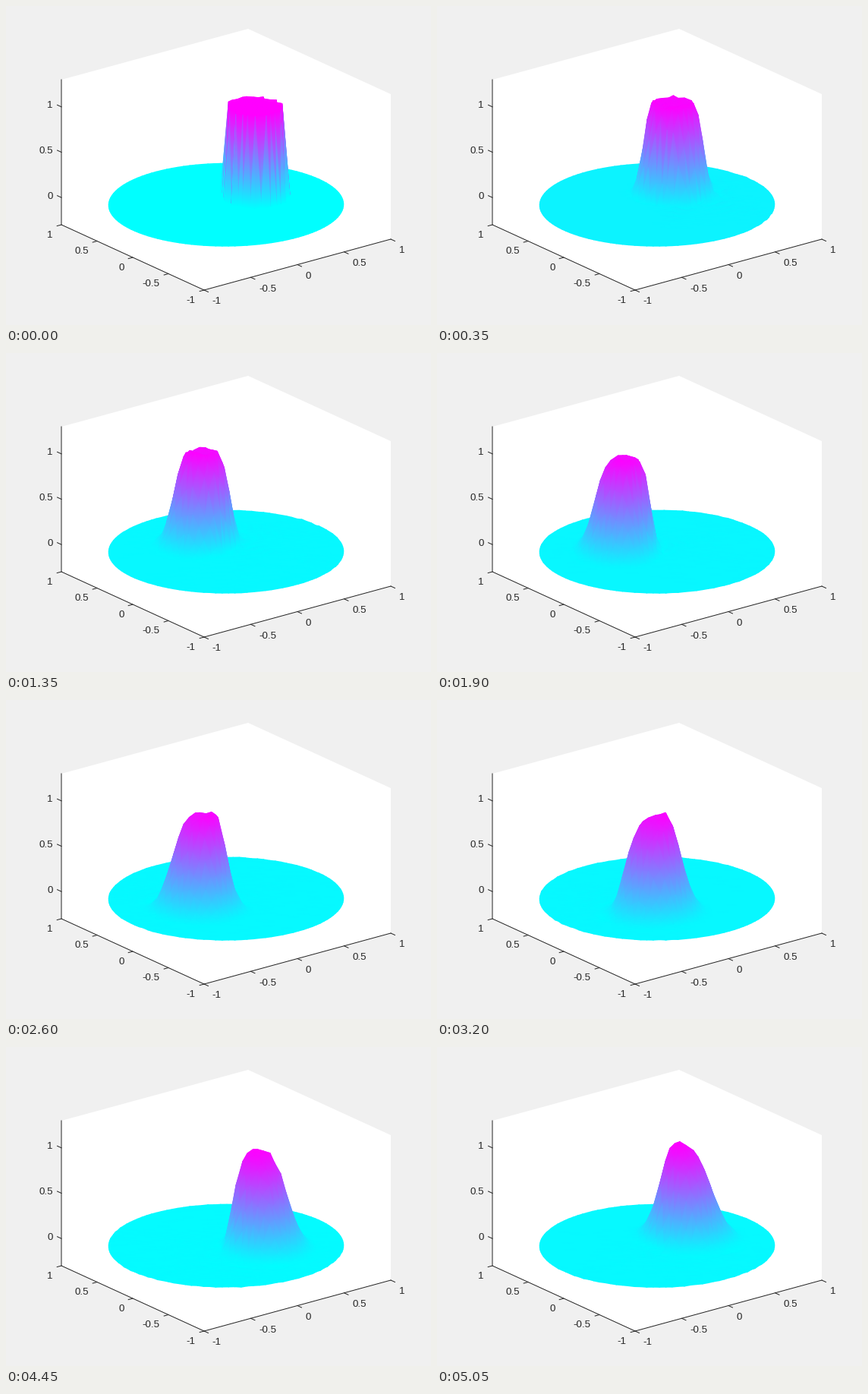
A matplotlib script for the animation above (5100 ms loop, 560 by 420 pixels).

```python
import matplotlib.pyplot as plt
import matplotlib.tri as mtri
import numpy as np
from matplotlib.animation import FuncAnimation

W, H, DPI = 560, 420, 100
FRAMES, INTERVAL = 102, 50
SIZE = 1 / 16                 # nominal mesh size
TURN = SIZE                   # radians per step, one cell at the rim
ZMIN, ZMAX, ZPX = -0.3, 1.3, 191 / 1.6
INK = "#262626"
PT = 72 / DPI                 # one pixel in points


def project(x, y, z):
    """Orthographic view of the box, in stage pixels."""
    px = 290 + 123 * x - 94 * y
    py = 297.5 - 33.5 * x - 43 * y - (z - ZMIN) * ZPX
    return px, py


def disk_mesh(h):
    rng = np.random.default_rng(4)
    n = int(1 / h) + 3
    col, row = np.meshgrid(np.arange(-n, n + 1), np.arange(-n, n + 1))
    x = h * (col + 0.5 * (row % 2)).ravel()
    y = h * np.sqrt(0.75) * row.ravel()
    x = x + rng.uniform(-0.2, 0.2, x.size) * h
    y = y + rng.uniform(-0.2, 0.2, y.size) * h
    inside = np.hypot(x, y) < 1 - 0.6 * h
    ring = np.linspace(0, 2 * np.pi, round(2 * np.pi / h), endpoint=False)
    x = np.r_[x[inside], np.cos(ring)]
    y = np.r_[y[inside], np.sin(ring)]
    return x, y, mtri.Triangulation(x, y).triangles


class Transport:
    """Crank-Nicolson linear elements with residual-based viscosity."""

    def __init__(self, x, y, tris):
        self.n, self.tris = x.size, tris
        tx, ty = x[tris], y[tris]
        nxt, prv = [1, 2, 0], [2, 0, 1]
        dx = ty[:, nxt] - ty[:, prv]
        dy = tx[:, prv] - tx[:, nxt]
        twice = (tx[:, 1] - tx[:, 0]) * (ty[:, 2] - ty[:, 0]) \
            - (tx[:, 2] - tx[:, 0]) * (ty[:, 1] - ty[:, 0])
        self.dx, self.dy = dx / twice[:, None], dy / twice[:, None]
        self.area = np.abs(twice) / 2

        cx = -TURN * ty.mean(1)
        cy = TURN * tx.mean(1)
        self.along = cx[:, None] * self.dx + cy[:, None] * self.dy
        self.cap = 0.25 * SIZE * np.hypot(cx, cy)

        area = self.area[:, None, None]
        mass = area / 12 * (np.ones((3, 3)) + np.eye(3))
        flow = area / 3 * np.repeat(self.along[:, None, :], 3, axis=1)
        stiff = (self.cap / 2)[:, None, None] * area * (
            self.dx[:, :, None] * self.dx[:, None, :]
            + self.dy[:, :, None] * self.dy[:, None, :])
        self.back = self.assemble(mass - flow / 2)
        self.inverse = np.linalg.inv(self.assemble(mass + flow / 2 + stiff / 2))

    def assemble(self, local):
        full = np.zeros((self.n, self.n))
        rows = np.repeat(self.tris[:, :, None], 3, axis=2)
        cols = np.repeat(self.tris[:, None, :], 3, axis=1)
        np.add.at(full, (rows, cols), local)
        return full

    def diffuse(self, nu, u):
        t = u[self.tris]
        gx = (self.dx * t).sum(1) * self.area * nu
        gy = (self.dy * t).sum(1) * self.area * nu
        local = self.dx * gx[:, None] + self.dy * gy[:, None]
        return np.bincount(self.tris.ravel(), local.ravel(), self.n)

    def viscosity(self, u, old):
        residual = np.abs((u - old)[self.tris].mean(1)
                          + (self.along * u[self.tris]).sum(1))
        spread = np.abs(u - u.mean()).max()
        return np.minimum(self.cap, SIZE ** 2 * residual / spread)

    def step(self, u, nu):
        rhs = self.back @ u - self.diffuse(nu, u) / 2
        new = u
        for _ in range(16):
            new = self.inverse @ (rhs - self.diffuse(nu - self.cap / 2, new) / 2)
        return new

    def run(self, u, count):
        states = [u, self.step(u, np.zeros(len(self.tris)))]
        while len(states) < count:
            old, u = states[-2:]
            states.append(self.step(u, self.viscosity(u, old)))
        return states


x, y, tris = disk_mesh(0.86 * SIZE)
start = (np.hypot(x - 0.3, y) < 0.25).astype(float)
states = Transport(x, y, tris).run(start, FRAMES)

fig = plt.figure(figsize=(W / DPI, H / DPI), dpi=DPI, facecolor="#f0f0f0")
ax = fig.add_axes([0, 0, 1, 1])

# far triangles first
px, ground = project(x, y, 0)
order = np.argsort(ground[tris].mean(axis=1))
mesh = mtri.Triangulation(px, ground, tris[order])
surface = ax.tripcolor(mesh, states[0], shading="gouraud", cmap="cool",
                       zorder=3)

outline = [(-1, 1, ZMAX), (1, 1, ZMAX), (1, -1, ZMAX),
           (1, -1, ZMIN), (-1, -1, ZMIN), (-1, 1, ZMIN)]
ax.fill(*zip(*(project(*c) for c in outline)), color="white", lw=0, zorder=1)


def line(xs, ys):
    ax.plot(xs, ys, color=INK, lw=PT, zorder=2)


def tick(at, direction, value, offset, align):
    ux, uy = np.array(direction) / np.hypot(*direction) * 6
    tx, ty = project(*at)
    line([tx, tx + ux], [ty, ty + uy])
    ax.text(tx + offset[0], ty + offset[1] + 4.4, f"{value:g}",
            family="Liberation Sans", size=13.33 * PT, color=INK,
            ha=align, va="baseline", zorder=4)


axis_path = [(-1, 1, ZMAX), (-1, 1, ZMIN), (-1, -1, ZMIN), (1, -1, ZMIN)]
line(*zip(*(project(*c) for c in axis_path)))
for v in (-1, -0.5, 0, 0.5, 1):
    tick((v, -1, ZMIN), (94, 43), v, (10.7, 14), "left")
    tick((-1, v, ZMIN), (-123, 33.5), v, (-11.3, 12.5), "right")
for v in (0, 0.5, 1):
    tick((-1, 1, v), (-94, -43), v, (-11.3, -3), "right")

ax.set_xlim(0, W)
ax.set_ylim(H, 0)
ax.axis("off")


def draw(i):
    u = states[i]
    mesh.y = ground - u * ZPX
    surface.set_array(u)
    surface.set_clim(u.min(), u.max())
    return [surface]


anim = FuncAnimation(fig, draw, frames=FRAMES, interval=INTERVAL,
                     repeat=True, repeat_delay=0, blit=False)
plt.show()
```
